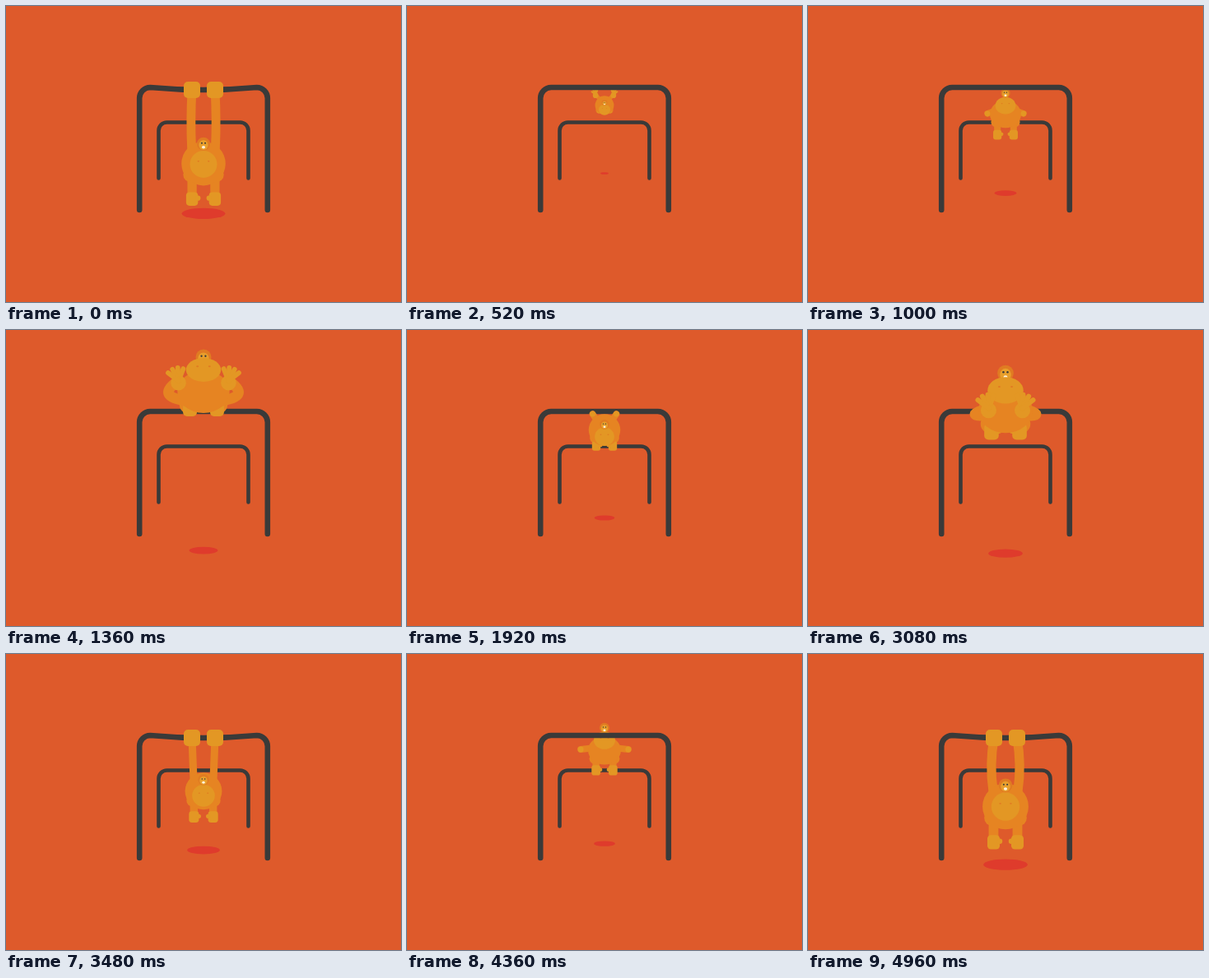
An HTML page with a canvas for the animation above (5 s loop, 480 by 360 pixels).

```html
<!DOCTYPE html>
<html lang="en">
<head>
<meta charset="utf-8">
<title>Swinging ape</title>
<style>
  html, body { margin: 0; width: 100%; height: 100%; overflow: hidden; background: #de5a2b; }
  canvas { display: block; width: 480px; height: 360px; }
</style>
</head>
<body>
<canvas id="stage" width="480" height="360"></canvas>
<script>
const ctx = document.getElementById('stage').getContext('2d');
const BG = '#de5a2b', FUR = '#e68422', SKIN = '#e39724', DARK = '#e07b22';
const BAR = '#3a3a39', SHADE = '#df3b2c';
const CYCLE = 5000 / 3, MID = 240;
const FRONT_Y = 99, BACK_Y = 141.5;

const clamp = v => Math.max(0, Math.min(1, v));
const mix = (a, b, u) => a + (b - a) * u;
const ease = u => (1 - Math.cos(Math.PI * u)) / 2;
const ramp = (t, a, b) => ease(clamp((t - a) / (b - a)));

// Cosine easing through a looping list of [time, value] turning points.
function wave(t, points) {
  const first = points[0], last = points[points.length - 1];
  const loop = [[last[0] - CYCLE, last[1]], ...points, [first[0] + CYCLE, first[1]]];
  const i = loop.findIndex(p => p[0] > t);
  const [[t0, v0], [t1, v1]] = [loop[i - 1], loop[i]];
  return mix(v0, v1, ease((t - t0) / (t1 - t0)));
}

// Nearly steady travel between the far (668 ms) and near (1421 ms) ends.
function scaleAt(t) {
  const far = 668, near = 1421;
  const since = (t - far + CYCLE) % CYCLE, rise = near - far;
  const turn = since < rise ? since / rise : 1 + (since - rise) / (CYCLE - rise);
  return .79 - .53 * Math.asin(.985 * Math.cos(Math.PI * turn)) / (Math.PI / 2);
}

function poseAt(t) {
  const late = t < 600 ? t + CYCLE : t;
  const s = scaleAt(t);
  const body = wave(t, [[30, 193], [360, 100], [840, 182], [1225, 47]]);
  const lean = wave(t, [[400, -35], [1340, 66], [1600, 0]]) * Math.PI / 180;
  const tilt = Math.sin(lean), forward = Math.max(0, tilt);

  const front = ramp(late, 1365, 1450) * (1 - ramp(late, 1902, 2000));
  const back = ramp(t, 510, 610) * (1 - ramp(t, 910, 985));
  const freeX = s * wave(t, [[960, 25], [1130, 62], [1350, 25]]);
  const freeY = body + s * wave(t, [[560, -32], [960, -1], [1400, -11]]);
  const reach = (free, frontBar, backBar) => mix(mix(free, frontBar, front), backBar, back);

  return {
    s, body, lean, tilt, forward,
    belly: body - 24 * s * tilt,
    head: body - 36 * s * Math.sin(lean + .73),
    shoulder: body + s * (-18 + 55 * Math.max(0, tilt - .4)),
    foot: body + s * wave(t, [[20, 50], [470, 20], [780, 54], [1300, 23]]),
    handX: reach(freeX, 14, 7),
    handY: reach(freeY, FRONT_Y + 3, BACK_Y + 1.5),
    bow: s * wave(t, [[60, 0], [1100, 0], [1350, 30]]),
    fist: front > .95 ? 20 : back > .95 ? 9.5 : 0,
    frontBend: front > .95 ? 3 : 0,
    backBend: back > .95 ? 1.5 : 0,
    spread: t < 700 ? ramp(t, 380, 480) : ramp(t, 1180, 1320),
    near: late > 1230 && late < 1930
  };
}

function oval(x, y, rx, ry, fill) {
  ctx.fillStyle = fill;
  ctx.beginPath();
  ctx.ellipse(x, y, rx, ry, 0, 0, Math.PI * 2);
  ctx.fill();
}

function box(x, y, w, h, r, fill) {
  ctx.fillStyle = fill;
  ctx.beginPath();
  ctx.roundRect(x - w / 2, y - h / 2, w, h, r);
  ctx.fill();
}

function curve(x0, y0, cx, cy, x1, y1, width, color) {
  ctx.strokeStyle = color;
  ctx.lineWidth = width;
  ctx.beginPath();
  ctx.moveTo(x0, y0);
  ctx.quadraticCurveTo(cx, cy, x1, y1);
  ctx.stroke();
}

function frame(half, top, bottom, r, width, bend) {
  const left = MID - half, right = MID + half;
  ctx.strokeStyle = BAR;
  ctx.lineWidth = width;
  ctx.beginPath();
  ctx.moveTo(left, bottom);
  ctx.arcTo(left, top, MID, top, r);
  ctx.quadraticCurveTo(MID, top + 2 * bend, right - r, top);
  ctx.arcTo(right, top, right, bottom, r);
  ctx.lineTo(right, bottom);
  ctx.stroke();
}

function mirrored(draw) {
  for (const side of [-1, 1]) {
    ctx.save();
    ctx.translate(MID, 0);
    ctx.scale(side, 1);
    draw();
    ctx.restore();
  }
}

function drawLimbs({ s, body, foot, shoulder, handX, handY, bow }) {
  const x = 13.5 * s, elbowX = (14 * s + handX) / 2 + bow;
  const elbowY = (shoulder + handY) / 2 + bow * .2;
  oval(15 * s, body + 13 * s, 9 * s, 9 * s, FUR);
  curve(x, body + 12 * s, x, body + 14 * s, x, foot - 9 * s, 11 * s, FUR);
  box(x, foot - 8 * s, 14 * s, 16 * s, 4 * s, SKIN);
  oval(x - 7 * s, foot - 9 * s, 3 * s, 3 * s, SKIN);
  curve(14 * s, shoulder, elbowX, elbowY, handX, handY, 10.5 * s, FUR);
}

function drawHand({ s, handX, handY, fist, spread }) {
  if (fist) return box(handX, handY, fist, fist, fist / 4, SKIN);
  const r = mix(4.6, 7.6, spread) * s;
  oval(handX, handY + 2 * s * spread, r, r, SKIN);
  for (let i = 0; i < 4; i++) {
    const a = -1.95 + i * .43, len = 13 * s * spread;
    const tipX = handX + Math.cos(a) * len, tipY = handY + Math.sin(a) * len;
    curve(handX, handY, handX, handY, tipX, tipY, 4.8 * s, SKIN);
  }
}

function drawHead({ s, head }) {
  oval(MID, head, 7.8 * s, 7.8 * s, DARK);
  oval(MID, head + 1.2 * s, 5.4 * s, 5.8 * s, '#e89f2c');
  oval(MID, head + 3.9 * s, 2 * s, 1.7 * s, '#fff3dc');
  mirrored(() => oval(2 * s, head - s, .95 * s, .95 * s, BAR));
}

function drawBelly({ s, belly, tilt, forward }) {
  const rx = 16 * s * (1 + .1 * forward);
  oval(MID, belly, rx, 16 * s * Math.sqrt(1 - .55 * tilt * tilt), SKIN);
  mirrored(() => oval(6 * s, belly - 3.5 * s, 1.2 * s, .8 * s, DARK));
}

function drawApe(p) {
  mirrored(() => drawLimbs(p));
  oval(MID, p.body, 26 * p.s, 26 * p.s * (1 - .2 * p.forward), FUR);
  const parts = [drawBelly, drawHead];
  if (p.lean > .8) parts.reverse();
  for (const part of parts) part(p);
  mirrored(() => drawHand(p));
}

function render(now) {
  const p = poseAt(now % CYCLE), { s } = p;
  ctx.fillStyle = BG;
  ctx.fillRect(0, 0, 480, 360);
  ctx.lineCap = ctx.lineJoin = 'round';

  // The shadow shrinks as the feet rise above the ground.
  const ground = 167 + 83 * s;
  const rx = 26 * s * (1.02 - .0035 * (ground - p.foot) / s);
  oval(MID, ground, rx, rx / 4, SHADE);

  const front = () => frame(77.8, FRONT_Y, 248, 13, 6.6, p.frontBend);
  frame(54.5, BACK_Y, 209.5, 10, 4.6, p.backBend);
  if (p.near) front();
  drawApe(p);
  if (!p.near) front();
}

function tick() {
  render(performance.now());
  requestAnimationFrame(tick);
}
tick();
</script>
</body>
</html>
```
